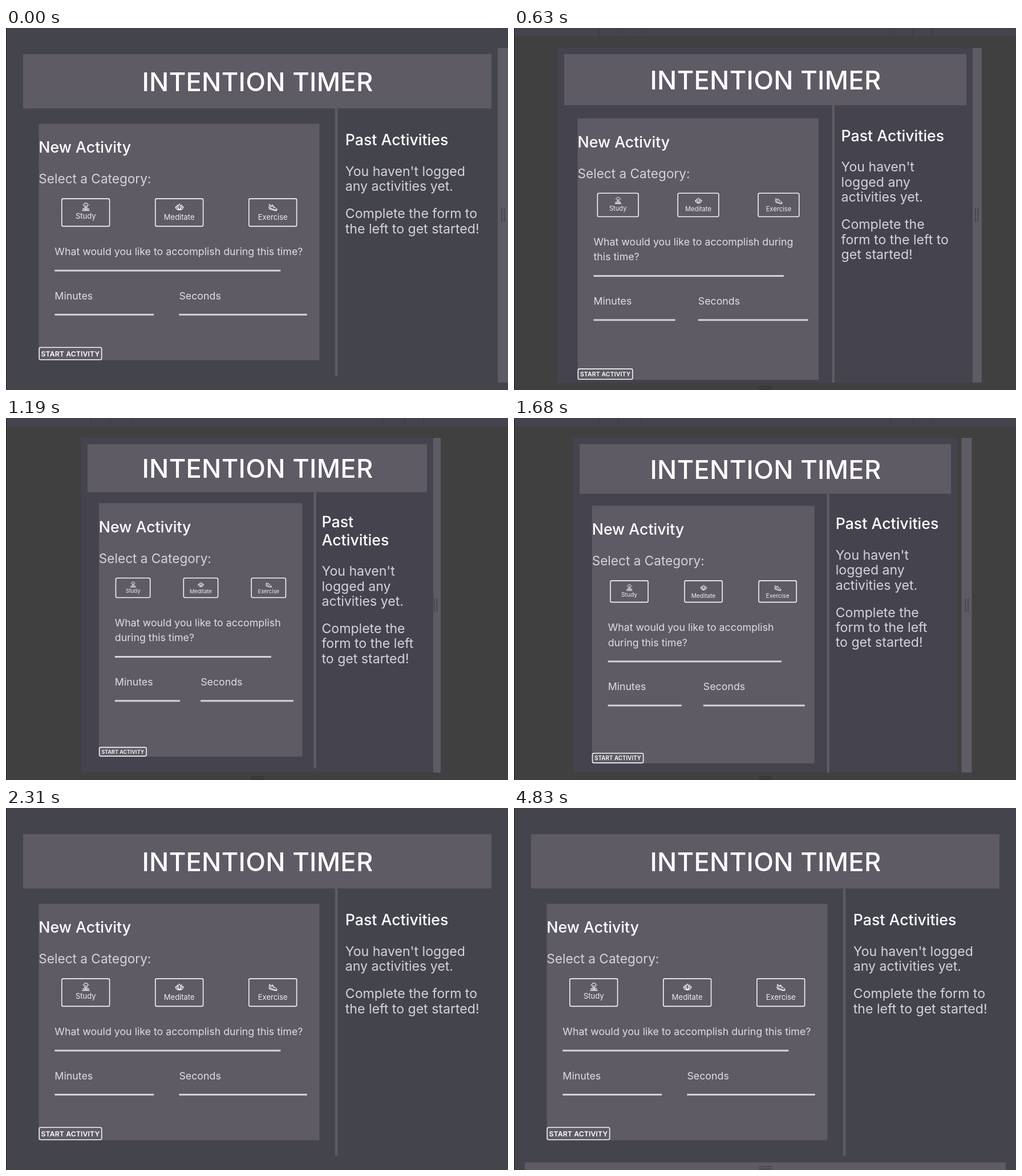
An HTML page with a canvas for the animation above (4900 ms loop, 880 by 636 pixels).

```html
<!DOCTYPE html>
<html lang="en">
<head>
<meta charset="utf-8">
<title>Intention Timer</title>
<style>
  html, body { margin: 0; width: 100%; height: 100%; overflow: hidden; background: #44444c; }
  canvas { display: block; }
</style>
</head>
<body>
<canvas id="stage" width="880" height="636"></canvas>
<script>
const ctx = document.getElementById('stage').getContext('2d');
const LOOP = 4900, STEP = 70, CENTER = 440.5, FULL = 862;
const DRAG_START = 70, DRAG_END = 2240, BAR_SHOWN = 4340;
const FONT = 'Inter, "Open Sans", sans-serif';
const PANEL = '#5e5b64', PAGE = '#44444c', VIEW = '#45434e', SOFT = '#d6d3da';

// Left edge of the drag handle, and the viewport edge trailing behind it
const handleKeys = [[0, 862], [70, 862], [560, 813], [630, 802], [1190, 744], [1300, 739], [1680, 784.5], [2170, 862]];
const edgeKeys = [[0, 862], [70, 862], [560, 817], [630, 804], [1190, 749], [1340, 740], [1680, 777], [2170, 862]];

function track(keys, t) {
  const last = keys.length - 1;
  if (t >= keys[last][0]) return keys[last][1];
  let i = 0;
  while (t >= keys[i + 1][0]) i++;
  const rate = k => (keys[k + 1][1] - keys[k][1]) / (keys[k + 1][0] - keys[k][0]);
  const slope = k => {
    if (k === 0 || k === last) return 0;
    const a = rate(k - 1), b = rate(k);
    return a * b > 0 ? 2 * a * b / (a + b) : 0;
  };
  const [t0, v0] = keys[i], [t1, v1] = keys[i + 1];
  const d = t1 - t0, u = (t - t0) / d, w = 1 - u;
  return v0 * w * w * (1 + 2 * u) + v1 * u * u * (3 - 2 * u)
    + d * u * w * (w * slope(i) - u * slope(i + 1));
}

function rect(x, y, w, h, color) {
  ctx.fillStyle = color;
  ctx.fillRect(x, y, w, h);
}

function text(str, x, y, size, { weight = 400, color = '#fff', align = 'left', gap = 0 } = {}) {
  ctx.font = `${weight} ${size}px ${FONT}`;
  ctx.letterSpacing = gap + 'px';
  ctx.textAlign = align;
  ctx.fillStyle = color;
  ctx.fillText(str, x, y);
}

function textLines(lines, x, y, size, leading, style) {
  lines.forEach((line, i) => text(line, x, y + i * leading, size, style));
  return y + (lines.length - 1) * leading;
}

function outline(x, y, w, h) {
  ctx.strokeStyle = '#f4f3f5';
  ctx.lineWidth = 1.6;
  ctx.beginPath();
  ctx.roundRect(x + 0.8, y + 0.8, w - 1.6, h - 1.6, 2.5);
  ctx.stroke();
}

// Bulb over a book, lotus, running shoe
const icons = [
  'M-2-1A3.5 3.5 0 1 1 2-1L1.5 1H-1.5ZM0-4V0M-6-4H-5M5-4H6M-6 3L-2 2L0 3.5L2 2L6 3M-7 6H7M-5 4.5H5',
  'M0-6Q-4-1 0 5Q4-1 0-6M-4-4Q-5 2 0 5Q5 2 4-4L2-2M-4-4L-2-2M-7-1Q-6 5 0 5Q6 5 7-1L4 0M-7-1L-4 0',
  'M-6-5L-7 1L4 5H7Q7 2 3 1L-1-4L-3-2ZM-7 3L3 6H7M-2-1L0-2M0 1L2 0M-4-3L-4 1'
].map(d => new Path2D(d));

function icon(i, x, y, scale) {
  ctx.save();
  ctx.translate(x, y);
  ctx.scale(scale, scale);
  ctx.strokeStyle = '#fff';
  ctx.lineWidth = 1.1;
  ctx.stroke(icons[i]);
  ctx.restore();
}

function questionLines(room) {
  if (room > 436) return ['What would you like to accomplish during this time?'];
  if (room > 350) return ['What would you like to accomplish during', 'this time?'];
  return ['What would you like to accomplish', 'during this time?'];
}

function pastLines(room) {
  const two = ["You haven't logged", 'any activities yet.'];
  const three = ["You haven't", 'logged any', 'activities yet.'];
  if (room > 236) return [two, ['Complete the form to', 'the left to get started!']];
  if (room > 209) return [two, ['Complete the form', 'to the left to get', 'started!']];
  if (room > 192) return [three, ['Complete the', 'form to the left to', 'get started!']];
  return [three, ['Complete the', 'form to the left', 'to get started!']];
}

function drawForm(x, y, w) {
  const room = w - 56, fx = x + 28;
  const lines = questionLines(room);
  const bw = w * 0.1735, bh = w * 0.106 - 2, by = y + 130.8;
  const qy = by + bh + 49.8;
  const goalY = qy + (lines.length - 1) * 26.3 + 27.2;
  const timeY = goalY + 77.4;
  const bottom = timeY + (lines.length > 1 ? 98 + (w - 357) * 0.108 : 80);
  rect(x, y, w, bottom - y, PANEL);

  text('New Activity', x, y + 51, 26.7, { weight: 500 });
  text('Select a Category:', x, y + 105.1, 22.6, { color: SOFT });

  ['Study', 'Meditate', 'Exercise'].forEach((name, i) => {
    const cx = x + w * (2 * i + 1) / 6 + 0.3;
    const size = w * 0.0264;
    outline(cx - bw / 2, by, bw, bh);
    icon(i, cx + 0.3, by + 3.7 + w * 0.0245, w / 492);
    text(name, cx, by + 1 + w * 0.062 + size * 0.36 + (i ? w * 0.004 : 0), size, { color: '#efedf1', align: 'center' });
  });

  const label = { color: '#e0dee3' };
  textLines(lines, fx, qy, 17.8, 26.3, label);
  text('Minutes', fx, timeY - 27, 17.8, label);
  text('Seconds', fx + room / 2, timeY - 27, 17.8, label);
  rect(fx, goalY - 1.5, room * 0.9 + 3.5, 3, SOFT);
  rect(fx, timeY - 1.5, room * 0.44 - 18, 3, SOFT);
  rect(fx + room / 2, timeY - 1.5, room * 0.455 + 26, 3, SOFT);

  const sw = w * 0.2 + 12.7, sh = w * 0.045 + 1;
  const size = w * 0.0249;
  outline(x, bottom - sh, sw, sh);
  text('START ACTIVITY', x + sw / 2, bottom - sh / 2 + size * 0.37, size, { weight: 600, align: 'center', gap: 0.1 });
  return bottom;
}

function drawPast(x, y, room) {
  const title = room < 180 ? ['Past', 'Activities'] : ['Past Activities'];
  let ty = textLines(title, x, y, 26.7, 32, { weight: 500 });
  const [first, second] = pastLines(room);
  ty = textLines(first, x, ty + 53.6, 23.1, 26.4, { color: SOFT });
  textLines(second, x, ty + 48, 23.1, 26.4, { color: SOFT });
}

function drawPage(edge) {
  const width = 2 * (edge - CENTER);
  const left = CENTER - width / 2 + 11, inner = width - 22;
  const headEnd = 141.4 - (843 - width) * 0.049;
  const margin = inner / 30;
  const split = left + inner * 0.666;
  const column = inner * 0.334 - 4.5;

  rect(left, 46, inner, headEnd - 46, PANEL);
  text('INTENTION TIMER', CENTER + 0.5, (46 + headEnd) / 2 + 17, 45.3, { weight: 500, align: 'center', gap: 0.3 });
  const bottom = drawForm(left + margin, headEnd + margin - 0.5, split - left - 2 * margin);
  rect(split, headEnd, 4.5, Math.min(bottom + margin, 623) - headEnd, PANEL);
  drawPast(split + 4.5 + column * 0.05, headEnd + 51.5 + column * 0.05, column * 0.9);
}

function drawSurround(edge) {
  rect(0, 0, 880, 636, '#404040');
  rect(0, 0, 880, 14.5, VIEW);
  for (const x of [149, 183, 221, 660, 699, 732]) rect(x - 0.5, 0, 1, 14, '#3b3a43');
  rect(429, 629.5, 24, 1.3, '#2f2f31');
  rect(429, 633.5, 24, 1.3, '#2f2f31');
  rect(2 * CENTER - edge, 35, 2 * (edge - CENTER), 588, VIEW);
}

function drawHandle(x, edge) {
  const from = Math.max(x, edge);
  rect(from, 35, x + 18 - from, 588, PANEL);
  rect(x + 6.3, 317, 1.4, 24, '#403e46');
  rect(x + 10.8, 317, 1.4, 24, '#403e46');
}

function draw(t) {
  const edge = track(edgeKeys, t);
  const dragging = t >= DRAG_START && t < DRAG_END;
  rect(0, 0, 880, 636, PAGE);
  if (dragging) drawSurround(edge);
  drawPage(edge);
  if (t < DRAG_END) drawHandle(track(handleKeys, t), edge);
  if (t >= BAR_SHOWN) {
    rect(19, 622.5, FULL - 19, 13.5, PANEL);
    rect(429, 629.5, 24, 1.4, '#403e46');
    rect(429, 633.5, 24, 1.4, '#403e46');
  }
  rect(0, 0, 1, 636, '#1c1c1e');
}

const start = performance.now();
function tick() {
  const t = (performance.now() - start) % LOOP;
  draw(Math.floor(t / STEP) * STEP);
  requestAnimationFrame(tick);
}
tick();
</script>
</body>
</html>
```
